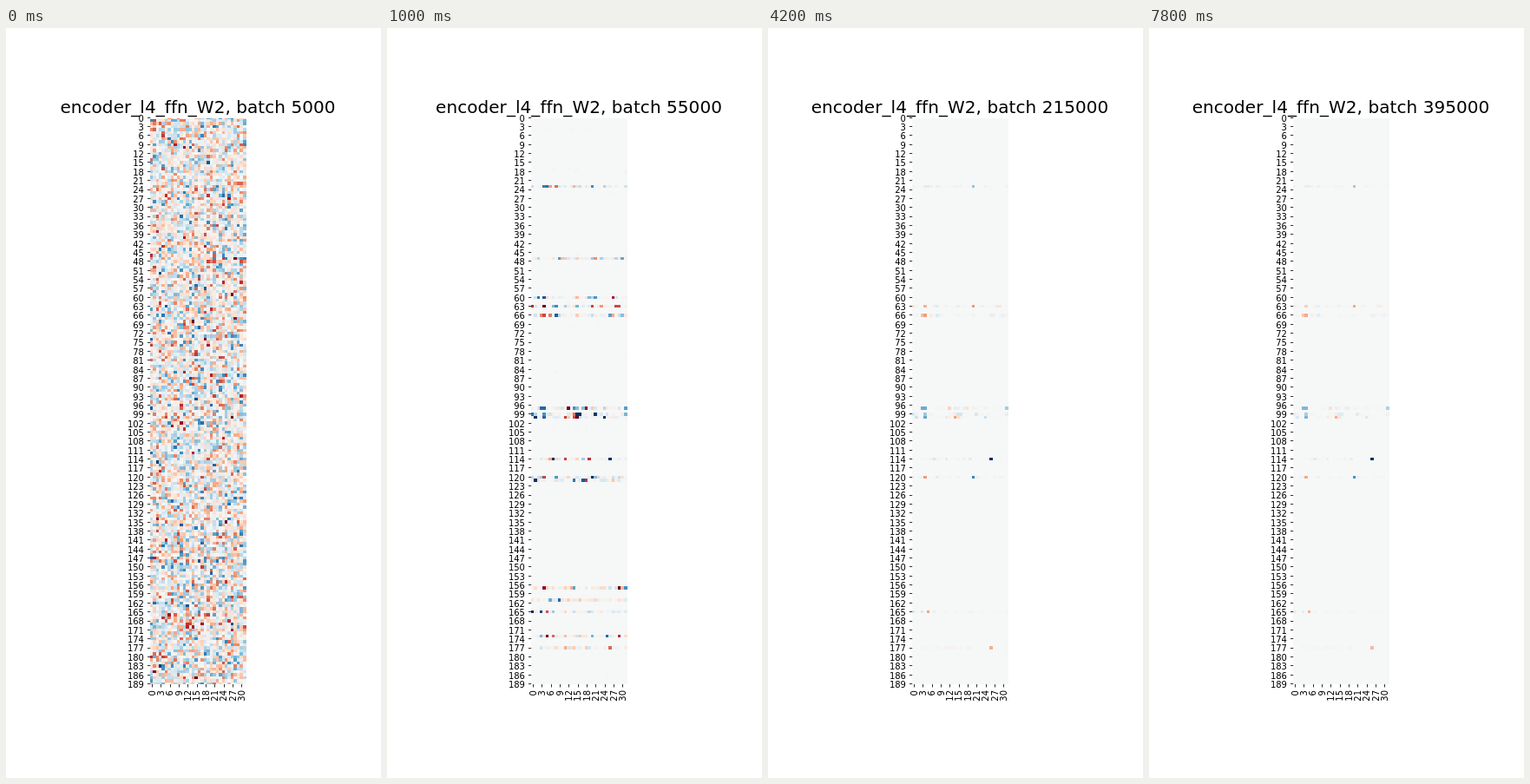
An HTML page with a canvas that plays this animation: 432 by 864 pixels, repeating every 8000 ms.

```html
<!DOCTYPE html>
<html lang="en">
<head>
<meta charset="utf-8">
<title>Weight heatmap</title>
<style>
  html, body { margin: 0; width: 100%; height: 100%; overflow: hidden; background: #fff; }
  canvas, svg { position: absolute; left: 0; top: 0; width: 432px; height: 864px; }
  text { font-family: "DejaVu Sans", sans-serif; font-size: 10px; fill: #000; }
  #title { font-size: 20px; letter-spacing: .06px; text-anchor: middle; }
  .label { text-anchor: end; }
  path { stroke: #000; stroke-width: .8; fill: none; }
</style>
</head>
<body>
<canvas id="map" width="432" height="864"></canvas>
<svg id="axes" viewBox="0 0 432 864"><text id="title" x="221" y="97.7"></text></svg>
<script>
const ROWS = 190, COLS = 32, TOP = 103.68, BOTTOM = 756;
const CELL = (BOTTOM - TOP) / (ROWS - 1);   // first and last rows show only half
const LEFT = 221.4 - COLS * CELL / 2;
const STEP = 200, STEPS = 40;

const ctx = document.getElementById('map').getContext('2d');
const axes = document.getElementById('axes');
const title = document.getElementById('title');

// Diverging palette from red through grey to blue
const stops = ['67001f', 'b2182b', 'd6604d', 'f4a582', 'fddbc7', 'f6f7f7',
               'd1e5f0', '92c5de', '4393c3', '2166ac', '053061']
  .map(h => [0, 2, 4].map(i => parseInt(h.slice(i, i + 2), 16)));

const clamp = (v, lo, hi) => Math.max(lo, Math.min(hi, v));

function colour(v) {
  const p = (clamp(v, -1, 1) + 1) * 5;
  const i = Math.min(9, Math.floor(p));
  return `rgb(${stops[i].map((a, n) => Math.round(a + (stops[i + 1][n] - a) * (p - i)))})`;
}

// Seeded noise
let seed = 4127;
function random() {
  seed = (seed + 0x6D2B79F5) | 0;
  let t = Math.imul(seed ^ (seed >>> 15), 1 | seed);
  t = (t + Math.imul(t ^ (t >>> 7), 61 | t)) ^ t;
  return ((t ^ (t >>> 14)) >>> 0) / 4294967296;
}
const gauss = () => Math.sqrt(-2 * Math.log(1 - random())) * Math.cos(2 * Math.PI * random());
const grid = fn => Array.from({ length: ROWS }, () => Array.from({ length: COLS }, (_, c) => fn(c)));

const start = grid(() => .29 * gauss());
// Trained weights: mostly faint with a few strong cells, column 4 the strongest
const trained = grid(c => {
  const g = gauss();
  return .07 * g * (1 + g * g) * (c === 4 ? 2.5 : 1);
});

// Rows by how long they last; the rest are faint or empty
const lasting = new Set([23, 63, 66, 97, 99, 100, 114, 120, 165, 177]);
const middling = new Set([47, 60, 121, 157, 161, 173]);
const brief = new Set([4, 7, 17, 18, 25, 46, 62, 70, 80, 85, 95, 104, 112, 172, 186]);
const faint = Array.from({ length: ROWS }, (_, r) =>
  random() < .25 && (r < 138 || r > 156) ? .5 * random() : 0);

// Cells that survive: row, column, final value
const survivors = [
  [23, 20, .35], [63, 20, -.38], [66, 3, -.27], [66, 4, -.37], [97, 3, .44], [97, 4, .44],
  [97, 31, .31], [99, 4, .33], [100, 4, .45], [100, 14, -.36], [114, 26, 1],
  [120, 4, -.38], [120, 20, .58], [165, 5, -.35], [177, 26, -.32]
];

// Strength of a row at step k
function strength(r, k) {
  const age = Math.max(0, k - 5);
  if (lasting.has(r)) return .12 + .88 * Math.exp(-age / 6);
  if (middling.has(r)) return clamp((14 - k) / 8, 0, 1) * Math.exp(-age / 6);
  return (brief.has(r) ? 1 : faint[r]) * Math.exp(-Math.max(0, k - 2) / .75);
}

function weights(k) {
  if (k === 0) return start;
  const cells = trained.map((row, r) => {
    const s = strength(r, k);
    return row.map((v, c) => v * s + (k === 1 ? .15 * start[r][c] : 0));
  });
  const boost = 1 + .8 * Math.exp(-Math.max(0, k - 5) / 9);
  for (const [r, c, v] of survivors) cells[r][c] = v * boost;
  return cells;
}

ctx.rect(166, 104, 111, 652);
ctx.clip();

// Each cell is 4px and trimmed by its neighbours
function draw(k) {
  weights(k).forEach((row, r) => row.forEach((v, c) => {
    ctx.fillStyle = colour(v);
    ctx.fillRect(Math.floor(LEFT + c * CELL), Math.floor(TOP + (r - .5) * CELL), 4, 4);
  }));
  title.textContent = `encoder_l4_ffn_W2, batch ${5000 + 10000 * k}`;
}

function add(tag, attrs, text = '') {
  const el = document.createElementNS('http://www.w3.org/2000/svg', tag);
  for (const name in attrs) el.setAttribute(name, attrs[name]);
  el.textContent = text;
  axes.append(el);
}

let ticks = '';
for (let r = 0; r < ROWS; r += 3) {
  const y = TOP + r * CELL;
  ticks += `M163 ${Math.ceil(y - .5) - .5}h3.2`;
  add('text', { class: 'label', x: LEFT - 7.2, y: y + 3.9 }, r);
}
for (let c = 0; c < COLS; c += 3) {
  const x = LEFT + (c + .5) * CELL;
  ticks += `M${Math.floor(x + .5) + .5} ${BOTTOM}v3.5`;
  add('text', { class: 'label', transform: `translate(${x + 3.7} ${BOTTOM + 7}) rotate(-90)` }, c);
}
add('path', { d: ticks });

let shown = -1;
function tick() {
  const k = Math.floor(performance.now() / STEP) % STEPS;
  if (k !== shown) draw(shown = k);
  requestAnimationFrame(tick);
}
tick();
</script>
</body>
</html>
```
